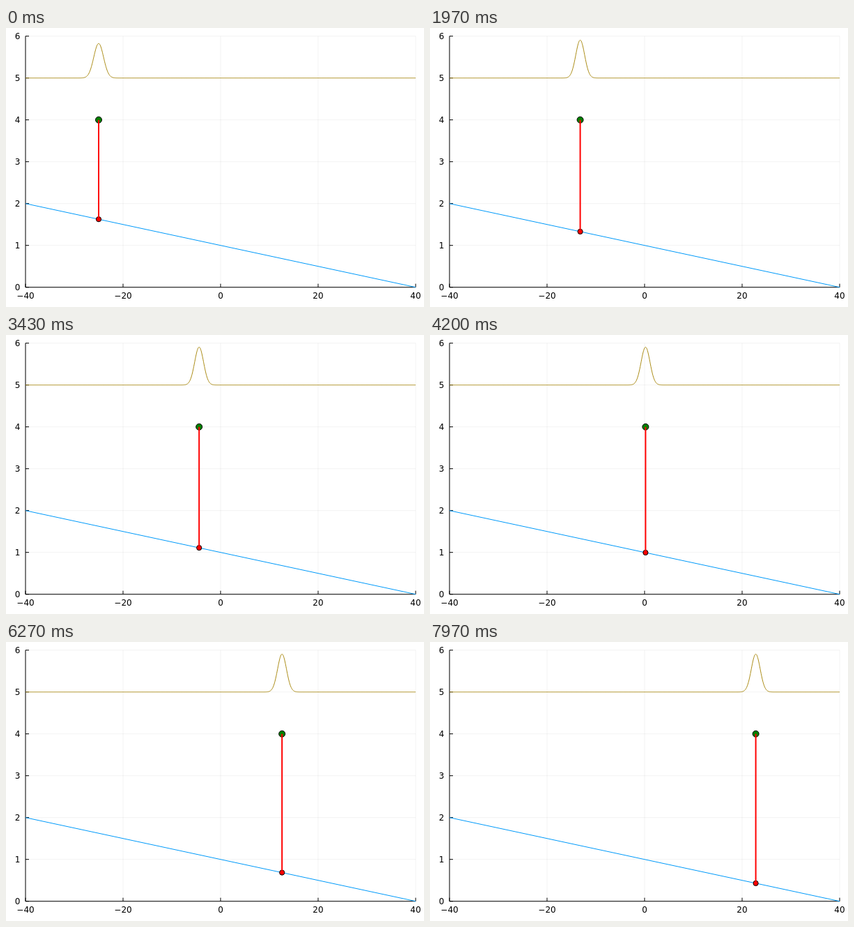
Animation, 600 px wide and 400 px high, one loop 8000 ms. Source, as an HTML page:

```html
<!DOCTYPE html>
<html lang="en">
<head>
<meta charset="utf-8">
<title>Moving pulse</title>
<style>
  html, body { margin: 0; width: 100%; height: 100%; overflow: hidden; background: #fff; }
  svg { display: block; width: 600px; height: 400px; }
  text { font: 12px "DejaVu Sans", sans-serif; }
  path { fill: none; }
  #grid { stroke: #000; stroke-opacity: .1; stroke-width: .5; }
  #axes { stroke: #000; }
  #slope { stroke: #009afa; }
  #pulse { stroke: #ac8d18; stroke-linejoin: round; }
  #rod { stroke: #f00; stroke-width: 2; }
  circle { stroke: #000; }
</style>
</head>
<body>
<svg viewBox="0 0 600 400">
  <path id="grid"/>
  <path id="axes"/>
  <g id="labels"></g>
  <path id="slope"/>
  <circle id="top" r="4.5" fill="#008000"/>
  <circle id="foot" r="3.6" fill="#f00"/>
  <path id="rod"/>
  <path id="pulse"/>
</svg>
<script>
const el = id => document.getElementById(id);
const draw = (id, d) => el(id).setAttribute('d', d);
const px = x => 308 + 7 * x;
const py = y => 371.7 - 60 * y;
const line = (x1, y1, x2, y2) => `M${x1} ${y1}L${x2} ${y2}`;
const slope = x => 1 - x / 40;

const LEFT = px(-40), RIGHT = px(40), BOTTOM = py(0), TOP = py(6);

function label(value, x, y, anchor) {
  const text = document.createElementNS('http://www.w3.org/2000/svg', 'text');
  text.setAttribute('x', x);
  text.setAttribute('y', y);
  text.setAttribute('text-anchor', anchor);
  text.textContent = String(value).replace('-', '\u2212');
  el('labels').append(text);
}

function drawFrame() {
  let grid = '';
  let axes = line(LEFT, TOP, LEFT, BOTTOM) + line(LEFT, BOTTOM, RIGHT, BOTTOM);
  for (let x = -40; x <= 40; x += 20) {
    grid += line(px(x), TOP, px(x), BOTTOM);
    axes += line(px(x), BOTTOM, px(x), BOTTOM - 5);
    label(x, px(x), 387.5, 'middle');
  }
  for (let y = 0; y <= 6; y++) {
    grid += line(LEFT, py(y), RIGHT, py(y));
    axes += line(LEFT, py(y), LEFT + 5, py(y));
    label(y, 20.3, py(y) + 4.5, 'end');
  }
  draw('grid', grid);
  draw('axes', axes);
  draw('slope', line(LEFT, py(slope(-40)), RIGHT, py(slope(40))));
}

function place(id, x, y) {
  el(id).setAttribute('cx', px(x));
  el(id).setAttribute('cy', py(y));
}

function drawStep(step) {
  const center = -25 + 0.2 * step;
  // The pulse starts wide and settles with its area preserved.
  const height = 0.905 - 0.08 * Math.exp(-step / 4);
  const sigma = 0.825 / height;
  const points = [];
  for (let i = 0; i <= 800; i++) {
    const x = -40 + i / 10;
    const y = 5 + height * Math.exp(-(((x - center) / sigma) ** 2) / 2);
    points.push(`${px(x).toFixed(2)} ${py(y).toFixed(2)}`);
  }
  draw('pulse', 'M' + points.join('L'));
  place('top', center, 4);
  place('foot', center, slope(center));
  draw('rod', line(px(center), py(4), px(center), py(slope(center))));
}

const start = performance.now();
let shown = -1;
function tick() {
  const hundredths = Math.floor((performance.now() - start) % 8000 / 10);
  const step = Math.floor((hundredths + 0.5) * 0.3);
  if (step !== shown) drawStep(shown = step);
  requestAnimationFrame(tick);
}

drawFrame();
tick();
</script>
</body>
</html>
```
